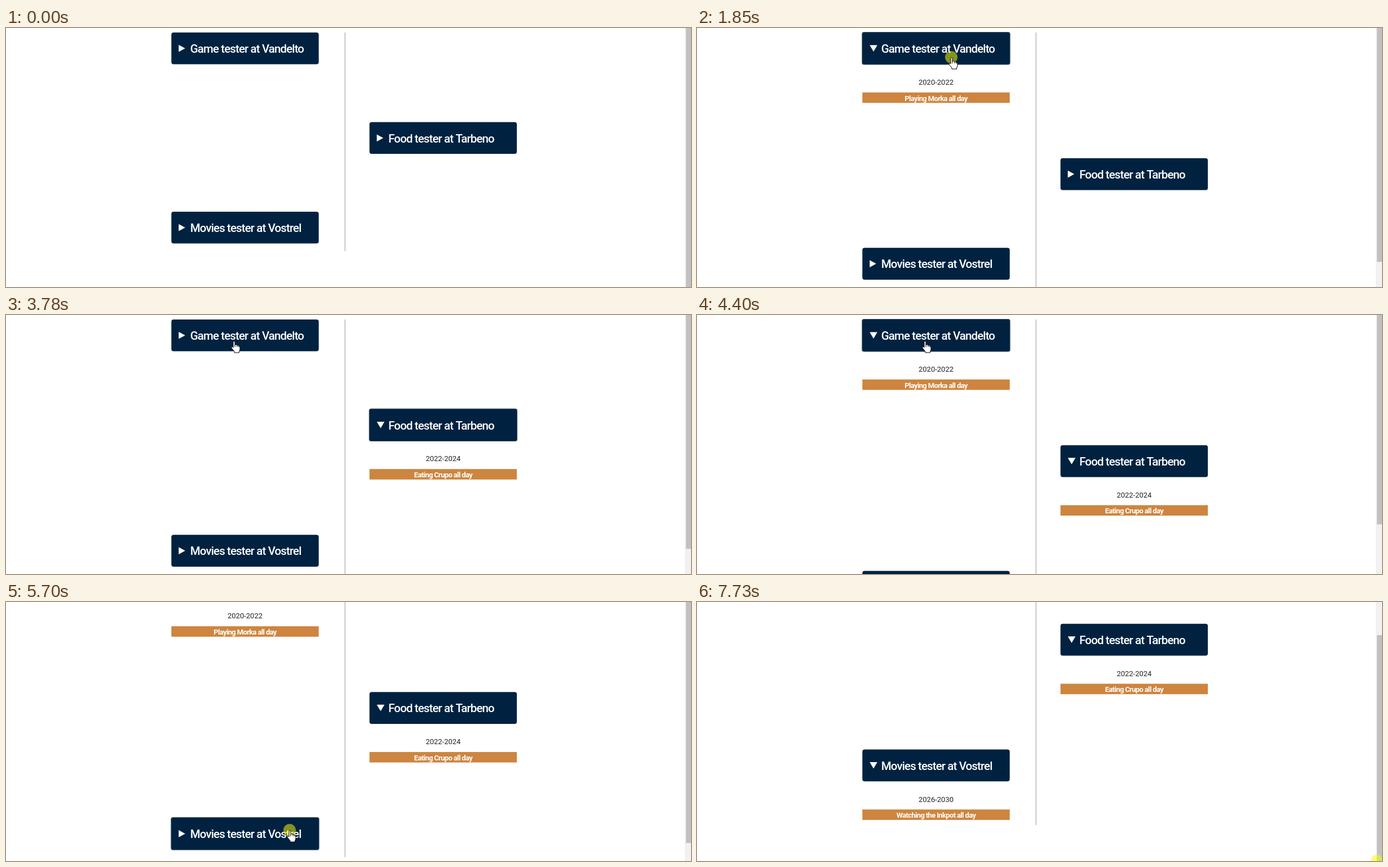
These frames come from a looping animation (1215x461 px, 7.9 s). An HTML page with a canvas:

```html
<!DOCTYPE html>
<html lang="en">
<head>
<meta charset="utf-8">
<title>Timeline</title>
<style>
html, body { margin: 0; width: 100%; height: 100%; overflow: hidden; background: #fff; }
canvas { display: block; }
</style>
</head>
<body>
<canvas id="stage" width="1215" height="461"></canvas>
<script>
const ctx = document.getElementById('stage').getContext('2d');
const LOOP = 7900, STEP = 77;
const TOP = 8, HEAD = 56.6, PITCH = 159.5, EXTRA = 64.3, WIDTH = 261.4;
const LEFT = 293.3, RIGHT = 644.7;

const cards = [
  { x: LEFT, title: 'Game tester at Vandelto', years: '2020-2022', task: 'Playing Morka all day' },
  { x: RIGHT, title: 'Food tester at Tarbeno', years: '2022-2024', task: 'Eating Crupo all day' },
  { x: LEFT, title: 'Movies tester at Vostrel', years: '2026-2030', task: 'Watching the Inkpot all day' }
];

const press = (down, card, hold = 150) => ({ down, up: down + hold, card });
const presses = [
  press(930, 0), press(1850, 0, 460), press(3320, 1),
  press(4150, 0), press(5700, 2), press(7730, -1, 300)
];

const move = (start, end, ...to) => ({ start, end, to });
const mouseMoves = [
  move(150, 300, 423, 105),
  move(530, 760, 452, 53),
  move(2460, 3003, 635, 155),
  move(3003, 3157, 677, 195),
  move(3540, 3770, 405, 47),
  move(4390, 4780, 548, 319),
  move(5210, 5544, 504, 407),
  move(6860, 7180, 1100, 475),
  move(7180, 7700, 1207, 462)
];
const scrollMoves = [move(4640, 5090, 71.5), move(5930, 6340, 193)];

const arrow = new Path2D('M.5.5V15.6L4 12.4L6.3 17.4L8.5 16.4L6.3 11.5H10.8Z');
const hand = new Path2D('M-2 10V1.2Q-2-.4-.5-.4T1 1.2V6Q4.6 5.2 5 7Q8 6.4 8 8Q10 8 10 10V14' +
  'Q10 16 8.5 18V20H0V18L-5 11.8Q-5.5 9.5-4 9.2Q-3 9.2-2 10.8Z');
const knuckles = new Path2D('M1 6V10M5 7V10M8 8V10.5');

const smooth = u => u * u * (3 - 2 * u);

function follow(moves, t, from) {
  return moves.reduce((pos, { start, end, to }) => {
    const u = smooth(Math.min(1, Math.max(0, (t - start) / (end - start))));
    return pos.map((p, i) => p + (to[i] - p) * u);
  }, from);
}

function rect(x, y, w, h, color) {
  ctx.fillStyle = color;
  ctx.fillRect(x, y, w, h);
}

function box(x, y, w, h, r, color) {
  ctx.fillStyle = color;
  ctx.beginPath();
  ctx.roundRect(x, y, w, h, r);
  ctx.fill();
}

function label(text, x, y, font, color, align, spacing) {
  ctx.font = font + ' Roboto, "Open Sans", sans-serif';
  ctx.letterSpacing = spacing + 'px';
  ctx.textAlign = align;
  ctx.fillStyle = color;
  ctx.fillText(text, x, Math.round(y));
}

function marker(x, y, open) {
  ctx.fillStyle = '#fff';
  ctx.fill(new Path2D(open
    ? `M${x} ${y}h13.6l-6.8 11.5z`
    : `M${x} ${y - .5}l11.5 6.3l-11.5 6.3z`));
}

function drawCard({ x, title, years, task }, y, open, focused) {
  const mid = x + WIDTH / 2;
  if (focused) box(x - 1, y - 1, WIDTH + 2, HEAD + 2, 4, '#43566c');
  box(x, y, WIDTH, HEAD, focused ? 3 : 4, '#002240');
  marker(x + 13, y + 22.5, open);
  label(title, x + 33.5, y + 36, '500 20.5px', '#fff', 'left', -.9);
  if (!open) return;
  label(years, mid, y + 92.9, '400 13px', '#222', 'center', 0);
  rect(x, y + 106.7, WIDTH, 18.6, '#cd853f');
  label(task, mid, y + 121.6, '600 13px', '#fff', 'center', -.65);
}

// The page's scrollbar starts above the visible stage.
function drawScrollbar(grown, scroll) {
  const track = 577, ratio = track / (606 + grown);
  rect(1204, 0, 11, 461, '#f1f1f1');
  rect(1206, ratio * scroll - 80.5, 9, track * ratio, '#c1c1c1');
}

function drawMouse(x, y, overCard, pressed) {
  if (pressed) {
    ctx.fillStyle = 'rgba(250,250,0,.53)';
    ctx.beginPath();
    ctx.arc(x - 1, y - 1, 11, 0, 7);
    ctx.fill();
  }
  ctx.save();
  ctx.translate(Math.round(x), Math.round(y));
  ctx.fillStyle = '#fff';
  ctx.strokeStyle = '#000';
  ctx.lineWidth = 1;
  const shape = overCard ? hand : arrow;
  ctx.fill(shape);
  ctx.stroke(shape);
  if (overCard) ctx.stroke(knuckles);
  ctx.restore();
}

function draw(now) {
  const t = now % LOOP;
  const tick = Math.floor(t / STEP + .15) * STEP;
  const [scroll] = follow(scrollMoves, tick, [0]);
  const [x, y] = follow(mouseMoves, tick, [597, 199]);

  const begun = presses.filter(p => t >= p.down);
  const last = begun[begun.length - 1];
  const isOpen = i => begun.filter(p => p.card === i && t >= p.up).length % 2 === 1;

  rect(0, 0, 1215, 461, '#fff');
  let grown = 0, overCard = false;
  cards.forEach((card, i) => {
    const top = TOP + i * PITCH + grown - scroll, open = isOpen(i);
    drawCard(card, top, open, last?.card === i);
    if (x >= card.x && x < card.x + WIDTH && y >= top && y < top + HEAD) overCard = true;
    if (open) grown += EXTRA;
  });
  rect(600, TOP - scroll, 2.6, 389 + grown, '#d3d3d3');
  drawScrollbar(grown, scroll);
  if (t >= 150) drawMouse(x, y, overCard, last && t < last.up);
}

const start = performance.now();
function frame() {
  draw(performance.now() - start);
  requestAnimationFrame(frame);
}
frame();
</script>
</body>
</html>
```
